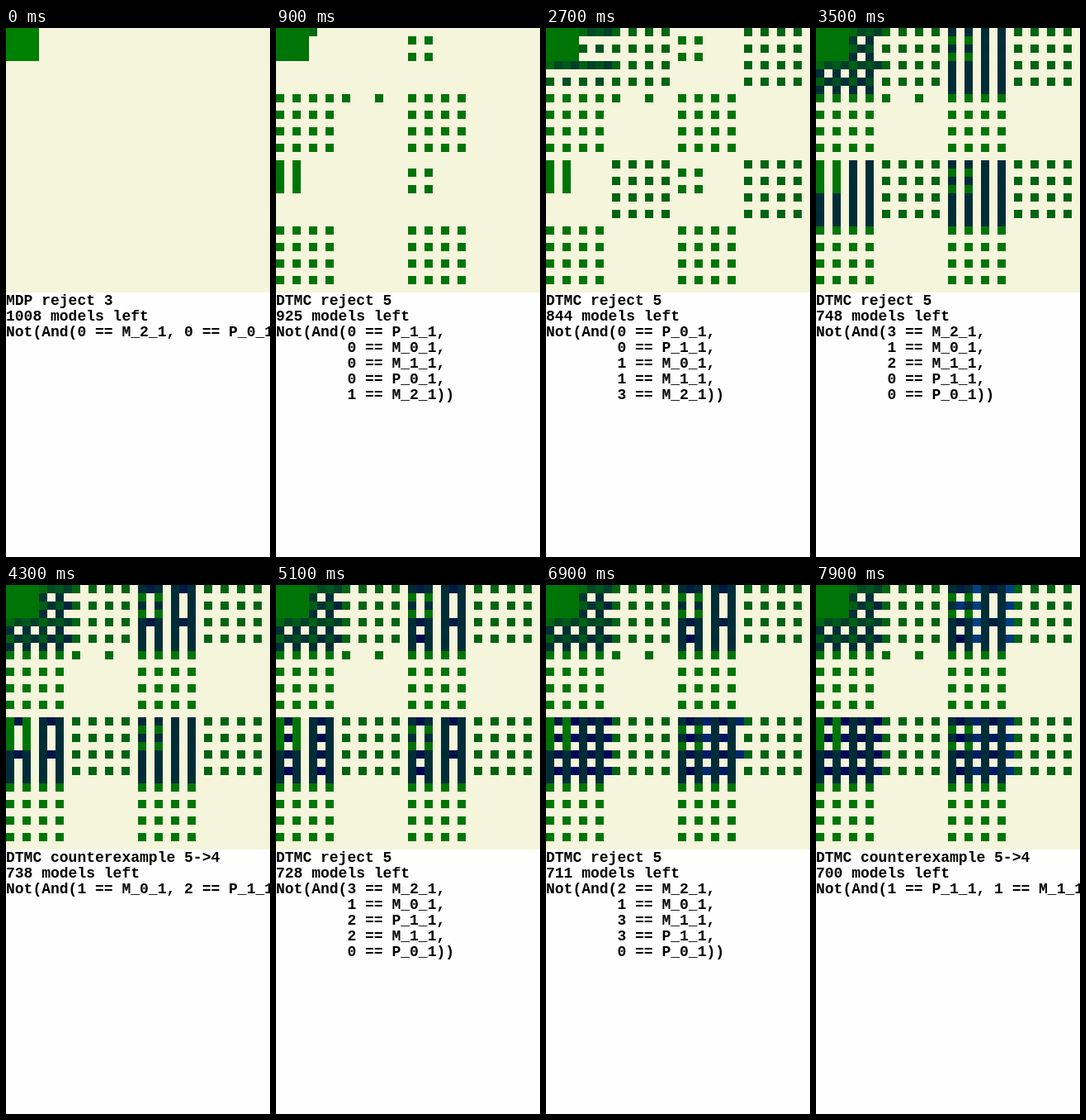
Animation of 320 by 640 pixels, one loop 8 s. Source, as an HTML page:

```html
<!DOCTYPE html>
<html lang="en">
<head>
<meta charset="utf-8">
<title>Model pruning</title>
<style>
  html, body { margin: 0; width: 100%; height: 100%; overflow: hidden; background: #fefefe; }
  svg { display: block; width: 320px; height: 640px; }
  rect { shape-rendering: crispEdges; }
  text { font: bold 18px "Liberation Mono", "Courier New", monospace; white-space: pre; fill: #000; }
</style>
</head>
<body>
<svg id="stage" viewBox="0 0 320 640">
  <rect width="320" height="640" fill="#fefefe"/>
  <rect width="320" height="320" fill="#f5f5dc"/>
</svg>
<script>
const STEP = 100, LOOP = 8000, CELL = 10, SIDE = 32, SHADES = 155;
const VARS = ["P_1_1", "P_0_1", "M_2_1", "M_1_1", "M_0_1"];

// One rejected pattern per step, digits in VARS order; * is free, - holds.
const CLAUSES = `
  000** 02000 *2**0 200*0 200*2 100*2 300*2 03000 03100 00100
  00200 *1**0 00300 00220 00120 00320 00210 00110 00310
  00130 00230 00330 00101 00201 00301 00111 00211 00311
  00302 00102 00221 00121 00231 *0**2 *0**0 00321 00331 00131 -
  10001 10301 10*01 20001 20*01 30201 30*01 20021 20121
  10221 30221 20221 20321 20311 20*11 30021 20231 -
  20031 20131 20331 - 30121 30321 30211 -
  30011 30111 30311 30031 30231 30131 30331 10021 10131
  10231 10331 - 10031 10311 10*11`.trim().split(/\s+/);

// Literal order in the printed clause, from the given step on.
const ORDERS = [[0, "21034"], [1, "04312"], [19, "10432"], [30, "24301"], [39, "24031"],
  [57, "42301"], [65, "24301"], [70, "24310"], [79, "03142"]];

const stage = document.getElementById("stage");

function add(tag, attrs) {
  const el = document.createElementNS("http://www.w3.org/2000/svg", tag);
  for (const key in attrs) el.setAttribute(key, attrs[key]);
  return stage.appendChild(el);
}

// Each variable takes one bit of x and one bit of y, highest first.
function digits(x, y) {
  return VARS.map((_, i) => (x >> (4 - i) & 1) + 2 * (y >> (4 - i) & 1)).join("");
}

function matches(pattern, model) {
  return [...pattern].every((c, i) => c === "*" || c === model[i]);
}

const cells = [];
for (let i = 0; i < SIDE * SIDE; i++) {
  const x = i % SIDE, y = Math.floor(i / SIDE), model = digits(x, y);
  const born = CLAUSES.findIndex(c => c !== "-" && matches(c, model));
  if (born < 0) continue;
  cells.push({ born, el: add("rect", { x: x * CELL, y: y * CELL, width: CELL, height: CELL }) });
}

const lines = Array.from({ length: 7 }, (_, i) => add("text", { x: 0, y: 335 + 19 * i }));

// Green through navy to blue, by the step of rejection.
function shade(born, step) {
  const v = step ? Math.max(0.028, born / SHADES) : 0;
  const g = Math.abs(3 * v - 1) / 2;
  return `rgb(0,${Math.round(255 * g)},${Math.round(255 * v)})`;
}

function title(size) {
  if (size === 5) return "DTMC reject 5";
  return size === 4 ? "DTMC counterexample 5->4" : "MDP reject " + size;
}

function caption(step) {
  const shown = CLAUSES[step] === "-" ? step - 1 : step;
  const clause = CLAUSES[shown];
  const order = ORDERS.filter(o => o[0] <= shown).pop()[1];
  const terms = [...order].filter(i => clause[i] !== "*").map(i => `${clause[i]} == ${VARS[i]}`);
  const left = SIDE * SIDE - cells.filter(c => c.born <= step).length;
  const glue = terms.length === 5 ? ",\n" + " ".repeat(8) : ", ";
  return [title(terms.length), left + " models left",
    ...`Not(And(${terms.join(glue)}))`.split("\n")];
}

let last = -1;
function draw(time) {
  const step = Math.floor(time % LOOP / STEP);
  if (step === last) return;
  last = step;
  for (const c of cells) {
    c.el.setAttribute("fill", c.born <= step ? shade(c.born, step) : "none");
  }
  const text = caption(step);
  lines.forEach((line, i) => { line.textContent = text[i] || ""; });
}

const start = performance.now();
function tick() {
  draw(performance.now() - start);
  requestAnimationFrame(tick);
}
tick();
</script>
</body>
</html>
```
